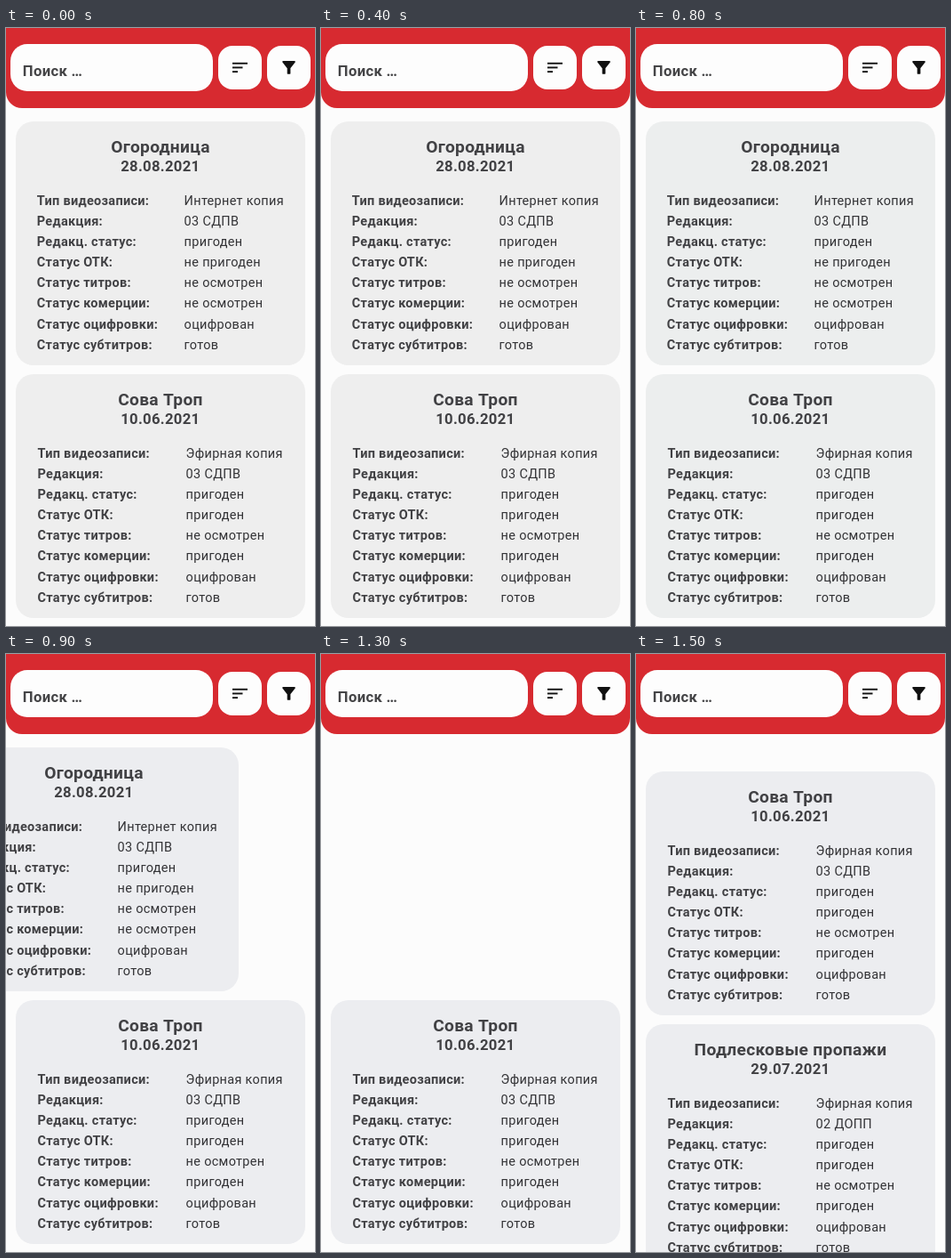
These frames come from a looping animation (348x672 px, 1600 ms). An HTML page with a canvas:

```html
<!DOCTYPE html>
<html lang="ru">
<head>
<meta charset="utf-8">
<style>
html, body { margin: 0; width: 100%; height: 100%; overflow: hidden; background: #fcfcfc; }
canvas { display: block; }
</style>
</head>
<body>
<canvas id="stage" width="348" height="672"></canvas>
<script>
const ctx = document.getElementById('stage').getContext('2d');
const LOOP = 1600, STEP = 100;
const CARD = { x: 11, top: 105, w: 326, h: 274, pitch: 284, radius: 20 };

const LABELS = ['Тип видеозаписи:', 'Редакция:', 'Редакц. статус:', 'Статус ОТК:',
  'Статус титров:', 'Статус комерции:', 'Статус оцифровки:', 'Статус субтитров:'];

const CARDS = [
  { title: 'Огородница', date: '28.08.2021', labelX: 34.8, valueX: 200.6,
    values: ['Интернет копия', '03 СДПВ', 'пригоден', 'не пригоден',
      'не осмотрен', 'не осмотрен', 'оцифрован', 'готов'] },
  { title: 'Сова Троп', date: '10.06.2021', labelX: 35.5, valueX: 202.6,
    values: ['Эфирная копия', '03 СДПВ', 'пригоден', 'пригоден',
      'не осмотрен', 'пригоден', 'оцифрован', 'готов'] },
  { title: 'Подлесковые пропажи', date: '29.07.2021', labelX: 35.5, valueX: 202.6,
    values: ['Эфирная копия', '02 ДОПП', 'пригоден', 'пригоден',
      'не осмотрен', 'пригоден', 'оцифрован', 'готов'] }
];

const SWIPE = [[800, 0], [900, -75], [1000, -199], [1100, -310], [1200, -348]];
const SCROLL = [[1300, 0], [1400, 211.5], [1500, 257], [1600, 284]];
const FUNNEL = new Path2D('M4.25 5.61C6.27 8.2 10 13 10 13v6c0 .55.45 1 1 1h2c.55 0 1-.45 1-1v-6' +
  's3.72-4.8 5.74-7.39C20.25 4.95 19.78 4 18.95 4H5.04C4.21 4 3.74 4.95 4.25 5.61z');

function sample(keys, t) {
  if (t <= keys[0][0]) return keys[0][1];
  for (let i = 1; i < keys.length; i++) {
    const [t0, v0] = keys[i - 1], [t1, v1] = keys[i];
    if (t <= t1) return v0 + (v1 - v0) * (t - t0) / (t1 - t0);
  }
  return keys[keys.length - 1][1];
}

function box(x, y, w, h, radius, color) {
  ctx.fillStyle = color;
  ctx.beginPath();
  ctx.roundRect(x, y, w, h, radius);
  ctx.fill();
}

function text(str, x, y, size, weight, color, align = 'left') {
  ctx.font = `${weight} ${size}px Roboto, sans-serif`;
  ctx.letterSpacing = '0.3px';
  ctx.textAlign = align;
  ctx.fillStyle = color;
  ctx.fillText(str, x, y);
}

function drawCard(card, dx, y, color) {
  ctx.save();
  ctx.translate(dx, y);
  box(CARD.x, 0, CARD.w, CARD.h, CARD.radius, color);
  text(card.title, 174, 34.8, 19.2, 700, '#414144', 'center');
  text(card.date, 173.8, 56, 16.7, 700, '#414144', 'center');
  LABELS.forEach((label, i) => {
    const rowY = 93.6 + i * 23.15;
    text(label, card.labelX, rowY, 14.5, 700, '#414144');
    text(card.values[i], card.valueX, rowY, 14.5, 400, '#333336');
  });
  ctx.restore();
}

function drawHeader() {
  box(0, -20, 348, 110, [0, 0, 18, 18], '#d72a30');
  box(5, 18, 228, 53, 19, '#fdfdfd');
  text('Поиск …', 18.8, 53.5, 16.7, 700, '#454547');
  box(239, 20, 49, 49, 16, '#fdfdfd');
  box(294, 20, 49, 49, 16, '#fdfdfd');
  ctx.fillStyle = '#111';
  [17, 11.5, 6].forEach((w, i) => ctx.fillRect(255, 38.8 + i * 4.7, w, 1.9));
  ctx.save();
  ctx.translate(307.5, 33.4);
  ctx.scale(0.92, 0.92);
  ctx.fill(FUNNEL);
  ctx.restore();
}

function draw(now) {
  const t = Math.floor((now % LOOP) / STEP) * STEP;
  const swipe = sample(SWIPE, t), scroll = sample(SCROLL, t);
  const cardColor = t < 700 ? '#eeeeee' : t < 900 ? '#eceeee' : '#ecedf0';
  ctx.fillStyle = '#fcfcfc';
  ctx.fillRect(0, 0, 348, 672);
  CARDS.forEach((card, i) => {
    const y = CARD.top + i * CARD.pitch - (i ? scroll : 0);
    if (y < 672 && (i || t < 1200)) drawCard(card, i ? 0 : swipe, y, cardColor);
  });
  drawHeader();
}

const start = performance.now();
function tick() {
  draw(performance.now() - start);
  requestAnimationFrame(tick);
}
tick();
</script>
</body>
</html>
```
